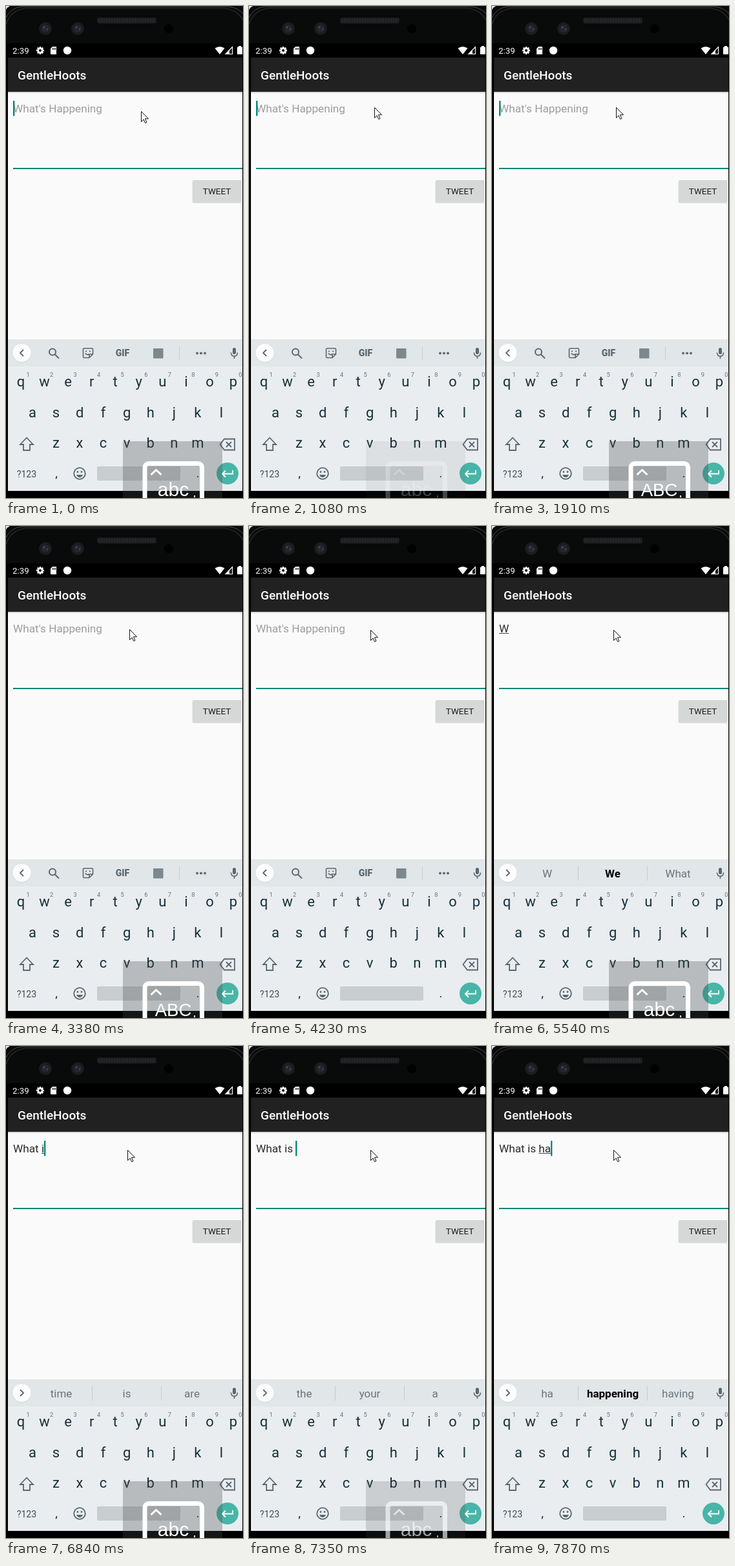
These frames come from a looping animation (367x763 px, 8 s). An HTML page with a canvas:

```html
<!DOCTYPE html>
<html lang="en">
<head>
<meta charset="utf-8">
<title>Compose screen</title>
<style>
html, body { margin: 0; width: 100%; height: 100%; overflow: hidden; background: #000; }
canvas { display: block; width: 367px; height: 763px; }
</style>
</head>
<body>
<canvas id="stage" width="367" height="763"></canvas>
<script>
const ctx = document.getElementById('stage').getContext('2d');
const LOOP = 8000, TICK = 130;
const SANS = 'Roboto, sans-serif', TEAL = '#008577', ICON = '#59676e', KEY = '#18303a';

// [time, x, y] of the mouse tip
const mouse = [[0, 209, 163], [290, 207, 184], [430, 200, 180], [550, 194, 174], [670, 191, 169],
  [820, 194, 164], [940, 195, 160], [1080, 194, 157], [1780, 192, 157], [3380, 191, 160], [3530, 188, 161]];
// [time, finished text, word in progress, suggestions, middle one bold]
const typing = [
  [0, '', ''],
  [4970, '', 'W', 'W We What', true],
  [5800, '', 'Wh', 'Wh What When', true],
  [6100, '', 'Wha', 'Wha What What\'s', true],
  [6250, '', 'What', 'What What\'s Whatever', true],
  [6540, 'What ', '', 'time is are'],
  [6840, 'What ', 'i', 'time is are'],
  [6970, 'What ', 'i', 'i is in', true],
  [7090, 'What ', 'is', 'is is it', true],
  [7210, 'What is ', '', 'the your a'],
  [7470, 'What is ', 'h', 'h happening he', true],
  [7710, 'What is ', 'ha', 'ha happening having', true]];
const blinks = [290, 820, 1360, 1780, 2220, 2810, 3240, 3530, 4100, 4970, 5420, 5800];
// [shown from, label, gone at]
const hints = [[-1, 'abc', 1210], [1780, 'ABC', 4230], [5420, 'abc', 7870]];

const latest = (list, t) => list.filter(e => e[0] <= t).pop();

function rect(x, y, w, h, color, r = 0) {
  ctx.fillStyle = color;
  ctx.beginPath();
  ctx.roundRect(x, y, w, h, r);
  ctx.fill();
}
function disc(x, y, r, color) {
  ctx.fillStyle = color;
  ctx.beginPath();
  ctx.arc(x, y, r, 0, 7);
  ctx.fill();
}
function stroke(d, color = ICON, width = 2) {
  ctx.strokeStyle = color;
  ctx.lineWidth = width;
  ctx.stroke(new Path2D(d));
}
function fill(d, color) {
  ctx.fillStyle = color;
  ctx.fill(new Path2D(d));
}
function text(s, x, y, size, color, weight = 400, align = 'left', family = SANS) {
  ctx.font = `${weight} ${size}px ${family}`;
  ctx.textAlign = align;
  ctx.fillStyle = color;
  ctx.fillText(s, x, y);
}

function phone() {
  rect(0, 0, 367, 763, '#000');
  rect(0, 0, 367, 58, '#090a0a');
  fill('M0 0H6Q2 2 0 6Z', '#ddd');
  stroke('M0 29Q6 7 30 3.5H338Q359 6 367 22', '#242627', 1.5);
  stroke('M0 18Q7 3 24 1H345Q360 3 367 12', '#4b4d4e', 1);
  rect(141, 18, 92, 9, '#1d1e1f', 3);
  for (let x = 144; x < 232; x += 4) stroke(`M${x} 20V25`, '#303132', 1);
  for (const x of [61, 111]) {
    disc(x, 35, 10, '#1b1c20');
    disc(x, 35, 6, '#25272d');
    disc(x - 2, 33, 1.5, '#4a4d55');
    disc(x + 3, 36, 1.2, '#444750');
  }
  disc(252, 35, 7, '#000');
}

function statusBar() {
  rect(3, 58, 363, 22, '#000');
  text('2:39', 10, 74, 13.3, '#fff');
  for (let i = 0; i < 4; i++) {
    const a = i * Math.PI / 4, c = Math.cos(a) * 6, s = Math.sin(a) * 6;
    stroke(`M${53 - c} ${69 - s}L${53 + c} ${69 + s}`, '#fff', 2.6);
  }
  disc(53, 69, 4.5, '#fff');
  disc(53, 69, 2, '#000');
  fill('M72 63H78V75H69V66Z', '#fff');
  stroke('M72.5 65V68M74.5 65V68M76.5 65V68', '#000', 1);
  disc(95, 69, 6.2, '#fff');
  fill('M323.5 65.5Q331 60.5 338.5 65.5L331 75Z', '#fff');
  stroke('M350.5 63.5V74.5H340Z', '#fff', 1.2);
  fill('M346 68V75H340Z', '#fff');
  rect(360, 62, 4, 3, '#fff');
  rect(358, 63.5, 8, 11.5, '#fff', 1);
}

function page() {
  rect(3, 133, 363, 384, '#fafafa');
  rect(3, 80, 363, 53, '#212121');
  ['#c4c4c4', '#e4e4e4', '#f3f3f3'].forEach((c, i) => rect(3, 133 + i, 363, 1, c));
  text('GentleHoots', 18, 114, 19, '#fff', 500);
  rect(11, 251, 355, 2, TEAL);
  rect(288.5, 271, 76, 34.8, '#dcdcdc', 2);
  rect(289, 270, 75.5, 34.5, '#d6d7d7', 2);
  text('TWEET', 326.5, 292, 13.4, '#1c1c1c', 400, 'center');
}

function keyboard() {
  rect(3, 517, 363, 235, '#e9edf0');
  rect(3, 517, 363, 42, '#e1e6e9');
  const step = 36.55;
  [...'qwertyuiop'].forEach((c, i) => {
    text(c, 23 + i * step, 590, 22, KEY, 400, 'center');
    text((i + 1) % 10, 34 + i * step, 575, 9.3, '#64727a', 400, 'center');
  });
  [...'asdfghjkl'].forEach((c, i) => text(c, 41 + i * step, 638, 22, KEY, 400, 'center'));
  [...'zxcvbnm'].forEach((c, i) => text(c, 77.5 + i * step, 685, 22, KEY, 400, 'center'));
  stroke('M32 669.5L42 680H37V689H27V680H22Z', ICON, 1.8);
  stroke('M338 671.5H354V688.5H338L331.5 680ZM341 676L349 684M349 676L341 684', ICON, 1.8);
  text('?123', 32, 731, 14.2, '#3c4d55', 400, 'center');
  text(',', 78, 731, 19, KEY, 400, 'center');
  text('.', 297, 731, 19, KEY, 400, 'center');
  stroke('M105.2 725a8.8 8.8 0 1 0 17.6 0a8.8 8.8 0 1 0 -17.6 0', ICON, 1.8);
  fill('M109 727H119Q117.5 731 114 731T109 727Z', ICON);
  disc(111, 722.5, 1.4, ICON);
  disc(117, 722.5, 1.4, ICON);
  rect(141, 714, 129, 22, '#c8cdd0', 2);
  disc(343, 725, 17, '#48b5a8');
  stroke('M351 720V725.5H335.5M340 720.5L335 725.5L340 730.5', '#fff', 2);
}

function strip(words, bold) {
  disc(24.5, 539, 14.3, '#d2d7da');
  disc(24.5, 538, 14, '#fcfcfc');
  stroke(words ? 'M22 533L27 538L22 543' : 'M27 533L22 538L27 543', ICON, 1.8);
  rect(351, 530, 5, 10, ICON, 2.5);
  stroke('M348.5 537.5Q348.5 543 353.5 543T358.5 537.5M353.5 543V547', ICON, 1.6);
  if (words) {
    stroke('M133.5 527V550M240.5 527V550', '#c5cbcf', 1);
    words.split(' ').forEach((w, i) => {
      const strong = bold && i === 1;
      text(w, [85.5, 187, 288][i], 545, 17, strong ? '#000' : '#68757b', strong ? 700 : 400, 'center');
    });
    return;
  }
  stroke('M67 536.5a5 5 0 1 0 10 0a5 5 0 1 0 -10 0M76 540.5L82 546.5');
  stroke('M121 531H133a1.5 1.5 0 0 1 1.5 1.5V540L129 545.5H121a1.5 1.5 0 0 1 -1.5 -1.5V532.5a1.5 1.5 0 0 1 1.5 -1.5ZM129 545V540H134M123 538.5Q125 542 128.5 540', ICON, 1.6);
  disc(124, 535.5, 1.1, ICON);
  disc(130, 535.5, 1.1, ICON);
  text('GIF', 180.5, 543, 14, ICON, 900, 'center');
  rect(228, 531, 15.5, 15.5, '#7c888e', 1);
  rect(268, 528, 1, 21, '#c5cbcf');
  for (const x of [296, 302, 308]) disc(x, 538.5, 1.9, ICON);
}

function field(done, word, caret) {
  const x = 11, y = 165, size = 17.2;
  if (!done && !word) text("What's Happening", x, y, size, '#9d9d9d');
  text(done + word, x, y, size, '#2b2b2b');
  const start = x + ctx.measureText(done).width;
  const end = x + ctx.measureText(done + word).width;
  if (word) rect(start, 166, end - start, 1, '#444');
  if (caret) rect(Math.floor(end), 147, 2.3, 23.5, TEAL);
}

function hint(label, alpha) {
  ctx.save();
  ctx.globalAlpha = alpha;
  rect(181, 675, 154, 88, 'rgba(70,70,70,.3)', 1);
  ctx.strokeStyle = '#fff';
  ctx.lineWidth = 7;
  ctx.beginPath();
  ctx.roundRect(215, 709.5, 88.5, 70, 6);
  ctx.stroke();
  stroke('M224.5 727L232.5 719.5L240.5 727', '#fff', 3);
  text(label, 259, 760, label === 'ABC' ? 27.5 : 30, '#fff', 400, 'center', '"Liberation Sans", sans-serif');
  rect(291, 759, 2, 3, '#fff');
  ctx.restore();
}

function pointer(x, y) {
  const d = 'M0 0V16L3.6 12.4L6.2 18L8.4 17L6 11.3H11Z';
  ctx.save();
  ctx.translate(x + .5, y + .5);
  fill(d, '#fff');
  stroke(d, '#111', 1);
  ctx.restore();
}

function draw(t) {
  const [, done, word, words, bold] = latest(typing, t);
  const caret = blinks.filter(b => b <= t).length % 2 === 0;
  phone();
  statusBar();
  page();
  keyboard();
  strip(words, bold);
  field(done, word, caret);
  const [, label, gone] = latest(hints, t);
  const ticksLeft = Math.ceil((gone - t) / TICK);
  if (ticksLeft > 0) hint(label, Math.min(1, (ticksLeft + 1) / 8));
  const [, x, y] = latest(mouse, t);
  pointer(x, y);
}

const began = performance.now();
function loop() {
  draw((performance.now() - began) % LOOP);
  requestAnimationFrame(loop);
}
loop();
</script>
</body>
</html>
```
